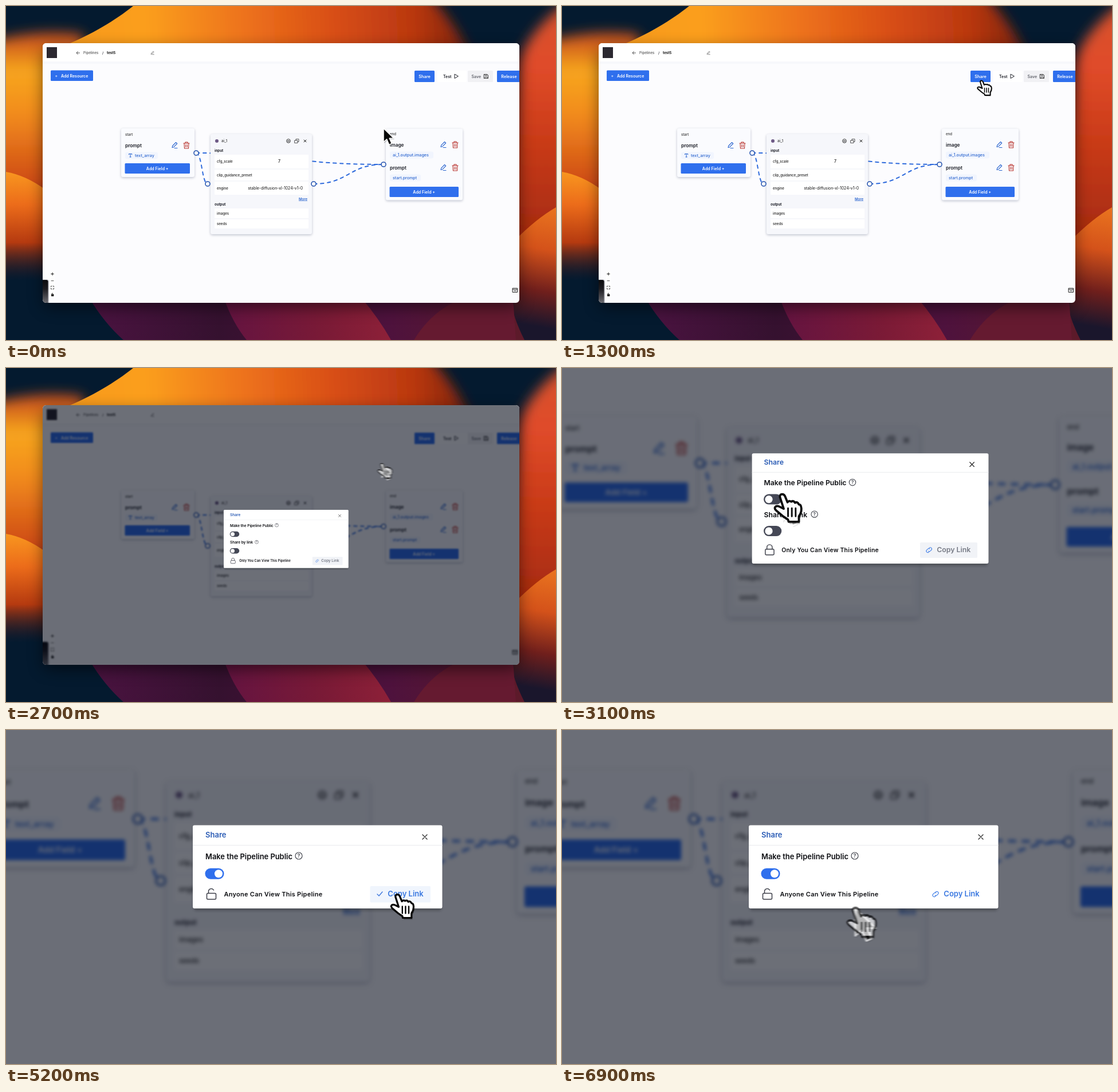
Recreate the animation shown at these times as an HTML page. Size 960x584 px, loop 7000 ms.

```html
<!DOCTYPE html>
<html lang="en">
<head>
<meta charset="utf-8">
<title>Share a pipeline</title>
<style>
html, body { margin: 0; width: 100%; height: 100%; overflow: hidden; background: #041a2f; }
svg { display: block; position: absolute; left: 0; top: 0; width: 960px; height: 584px; }
text { font-family: Inter, "Liberation Sans", sans-serif; white-space: pre; }
</style>
</head>
<body>
<svg id="stage" viewBox="0 0 960 584" xmlns="http://www.w3.org/2000/svg">
<defs>
  <filter id="haze" x="-20%" y="-50%" width="140%" height="200%"><feGaussianBlur stdDeviation="11"/></filter>
  <filter id="shade" x="-20%" y="-20%" width="140%" height="140%"><feGaussianBlur stdDeviation="14"/></filter>
  <filter id="soft" x="-10%" y="-10%" width="120%" height="120%"><feGaussianBlur stdDeviation="2.2"/></filter>
  <filter id="frost" filterUnits="userSpaceOnUse" x="50" y="50" width="860" height="490" color-interpolation-filters="sRGB"><feGaussianBlur stdDeviation="1.7"/></filter>
  <filter id="smear" filterUnits="userSpaceOnUse" x="-30" y="-20" width="80" height="80"><feGaussianBlur id="smearBlur" stdDeviation="0"/></filter>
  <clipPath id="winClip"><rect x="64" y="65" width="832" height="454" rx="6"/></clipPath>
  <clipPath id="petalClip"><path d="M222 0C192 24 150 50 100 70H960V0Z"/></clipPath>
  <linearGradient id="gTop" gradientUnits="userSpaceOnUse" x1="120" y1="60" x2="810" y2="30">
    <stop offset="0" stop-color="#f79a1b"/><stop offset=".18" stop-color="#fb9f1e"/><stop offset=".42" stop-color="#ee741b"/>
    <stop offset=".65" stop-color="#d94f17"/><stop offset=".86" stop-color="#b93710"/><stop offset="1" stop-color="#7a220e"/>
  </linearGradient>
  <linearGradient id="gLeft" gradientUnits="userSpaceOnUse" x1="0" y1="55" x2="0" y2="320">
    <stop offset="0" stop-color="#c9501a"/><stop offset=".22" stop-color="#f7a620"/><stop offset=".5" stop-color="#f28c1d"/><stop offset="1" stop-color="#cb4515"/>
  </linearGradient>
  <linearGradient id="gLeft2" gradientUnits="userSpaceOnUse" x1="0" y1="290" x2="0" y2="480">
    <stop offset="0" stop-color="#f8961f"/><stop offset=".3" stop-color="#ec6c1a"/><stop offset=".65" stop-color="#b53a10"/><stop offset="1" stop-color="#3a1a20" stop-opacity="0"/>
  </linearGradient>
  <linearGradient id="gRight" gradientUnits="userSpaceOnUse" x1="0" y1="10" x2="0" y2="400">
    <stop offset="0" stop-color="#d8522c"/><stop offset=".25" stop-color="#e04b2a"/><stop offset=".6" stop-color="#c83a17"/><stop offset="1" stop-color="#a62b10"/>
  </linearGradient>
  <linearGradient id="gRight2" gradientUnits="userSpaceOnUse" x1="960" y1="355" x2="925" y2="560">
    <stop offset="0" stop-color="#e9731f"/><stop offset=".35" stop-color="#d4521a"/><stop offset=".7" stop-color="#701f1c"/><stop offset="1" stop-color="#1a162c"/>
  </linearGradient>
  <linearGradient id="gBase" gradientUnits="userSpaceOnUse" x1="150" y1="0" x2="890" y2="0">
    <stop offset="0" stop-color="#4a1340"/><stop offset=".3" stop-color="#35112f"/><stop offset=".7" stop-color="#4e123d"/><stop offset="1" stop-color="#5c1a2a"/>
  </linearGradient>
  <linearGradient id="gMid" gradientUnits="userSpaceOnUse" x1="390" y1="0" x2="665" y2="0">
    <stop offset="0" stop-color="#651440"/><stop offset=".6" stop-color="#7a1a36"/><stop offset="1" stop-color="#8c2038"/>
  </linearGradient>
  <linearGradient id="gTab" x1="0" y1="0" x2="0" y2="1"><stop offset="0" stop-color="#0b0b0e"/><stop offset=".35" stop-color="#1c1c21"/><stop offset="1" stop-color="#77777d"/></linearGradient>
</defs>
<g id="wall">
  <rect width="960" height="584" fill="#041a2f"/>
  <path d="M-40 66Q50 38 135 50V330H-40Z" fill="url(#gLeft)" filter="url(#haze)"/>
  <path d="M0 290Q35 296 70 322V500H0Z" fill="url(#gLeft2)"/>
  <g clip-path="url(#petalClip)"><path d="M0-60H690Q775 0 815 100H0Z" fill="url(#gTop)" filter="url(#haze)"/></g>
  <path d="M1000-20Q918 30 893 100L870 440H1000Z" fill="url(#gRight)" filter="url(#haze)"/>
  <path d="M960 352Q925 372 886 412V584H960Z" fill="url(#gRight2)"/>
  <path d="M145 510Q172 555 205 584H905Q885 545 880 510Z" fill="url(#gBase)"/>
  <path d="M380 510Q396 555 420 584H672Q650 545 620 510Z" fill="url(#gMid)"/>
  <path d="M800 510Q745 530 712 584H890L885 510Z" fill="#651a30"/>
</g>
<g id="view">
  <rect x="66" y="76" width="828" height="450" rx="8" fill="#000" opacity=".55" filter="url(#shade)"/>
  <g clip-path="url(#winClip)">
    <rect x="64" y="65" width="832" height="454" fill="#fcfcfe"/>
    <g id="app"></g>
    <rect id="dim" x="64" y="65" width="832" height="454" fill="#030816" opacity=".58"/>
  </g>
  <g id="dialog" transform="translate(217 179.25) scale(.5)"></g>
  <g id="cursor">
    <g filter="url(#smear)">
      <g id="arrow">
        <path d="M1 2V26L6.500 21L10.500 30L15 28L11 19H19Z" fill="#000" opacity=".25"/>
        <path d="M0 0V24L5.600 18.900L9.600 28.500L14.200 26.500L10.200 17.300H17.800Z" fill="#080808" stroke="#fff" stroke-width="1.500" stroke-linejoin="round"/>
      </g>
      <g id="hand" transform="scale(.5)" stroke-linecap="round" stroke-linejoin="round">
        <path id="palmShade" fill="#000" opacity=".25" transform="translate(2 4)"/>
        <path id="palm" fill="#fff" stroke="#060606" stroke-width="4"/>
        <path d="M11 25V40M18 25V40M25 25V40" stroke="#060606" stroke-width="3" fill="none"/>
      </g>
    </g>
  </g>
</g>
</svg>
<script>
const LOOP = 7000, STEP = 100;
const BLUE = '#2f6fed', INK = '#1d1f27', LINK = '#2c66cf', RED = '#b8322c';
const $ = id => document.getElementById(id);

// drawing helpers
const text = (x, y, s, size, fill = INK, weight = 500, more = '') =>
  `<text x="${x}" y="${y}" font-size="${size}" fill="${fill}" font-weight="${weight}" ${more}>${s}</text>`;
const rect = (x, y, w, h, fill, r = 1.5, more = '') =>
  `<rect x="${x}" y="${y}" width="${w}" height="${h}" rx="${r}" fill="${fill}" ${more}/>`;
const line = (d, color, w = 1, more = '') =>
  `<path d="${d}" fill="none" stroke="${color}" stroke-width="${w}" stroke-linecap="round" stroke-linejoin="round" ${more}/>`;
const at = (x, y, s, k = 1) => `<g transform="translate(${x} ${y}) scale(${k})">${s}</g>`;
const mid = 'text-anchor="middle"';

const button = (x, y, w, h, label, size = 7) =>
  rect(x, y, w, h, BLUE) + text(x + w / 2, y + h / 2 + size * .36, label, size, '#fff', 600, mid);
const card = (x, y, w, h, fill) =>
  rect(x, y + 1.5, w, h, '#5a6480', 3, 'opacity=".38" filter="url(#soft)"') + rect(x, y, w, h, fill, 3);
const pencil = (x, y, color, k = 1) =>
  at(x, y, line('M-4 4L-3.300 1L2.500-5L4.700-3L-1.200 3.200ZM0 5H5', color, 1.1), k);
const trash = (x, y) =>
  at(x, y, line('M-5-3.500H5M-2-3.500V-5.500H2V-3.500M-4-3.500L-3.500 5.500H3.500L4-3.500M-1.300-1V3M1.300-1V3', RED, 1.1));
const knob = (x, y) => `<circle cx="${x}" cy="${y}" r="4" fill="#fff" stroke="#2856b0" stroke-width="1.600"/>`;
const edge = (x1, y1, x2, y2) => {
  const m = (x1 + x2) / 2;
  return line(`M${x1} ${y1}C${m} ${y1} ${m} ${y2} ${x2} ${y2}`, '#2f6bdc', 2, 'stroke-dasharray="5.5 6.5"');
};
const pill = (x, y, w) => rect(x, y, w, 12, '#f1f5fe', 3);
const field = (x, y, name) => text(x, y + 3.5, name, 8.3, INK, 600);
const tools = (x, y) => pencil(x, y, LINK) + trash(x + 21, y);

function header() {
  return rect(64, 65, 832, 32, '#fff', 0) + rect(64, 97, 832, 4, '#f7f8fb', 0)
    + rect(71, 72, 18, 19, '#2b2830', 0)
    + line('M128.500 82H123M125.500 79.500L123 82L125.500 84.500', '#444', .9)
    + text(135, 84.2, 'Pipelines', 6.1, '#555') + text(168, 84.2, '/', 6.1)
    + text(176, 84.2, 'test5', 6.1, '#111', 700) + pencil(255.5, 82, '#333', .55);
}

function toolbar() {
  return rect(78, 112.5, 74, 18.5, BLUE)
    + text(85.5, 124.6, '+', 7, '#fff', 500) + text(96, 124.6, 'Add Resource', 7, '#fff', 600)
    + button(713, 113, 35, 20, 'Share', 7.3)
    + rect(753, 113, 51, 20, '#fff') + text(763, 125.8, 'Test', 7, INK, 600)
    + line('M783 119.500V126.500L789 123Z', INK, 1)
    + rect(806, 113, 44, 20, '#f1f1f4') + text(812.5, 125.8, 'Save', 7, '#62646c', 600)
    + line('M834.500 119.500H840L841.500 121V126.500H834.500ZM836 119.500V121.500H839.500V119.500M836 126.500V124H840V126.500', '#333', .9)
    + button(857, 113, 42, 20, 'Release', 7.2);
}

function startCard() {
  return card(201, 214, 128, 85, '#fafbfe')
    + text(208, 227, 'start', 6, '#333') + field(208, 243.5, 'prompt') + tools(294, 243.5)
    + pill(208, 255.5, 57) + line('M214.500 259.800V258.500H219.700V259.800M217.100 258.500V264M216 264H218.200', LINK, 1)
    + text(225, 264, 'text_array', 7.1, LINK) + button(207.5, 275, 113.5, 18, 'Add Field +', 7.1);
}

function endCard() {
  return card(663, 214.5, 134, 125, '#fafbfe')
    + text(670, 226, 'end', 6, '#333')
    + field(670, 242, 'image') + tools(763, 242.5) + pill(670, 254.5, 76) + text(675, 263, 'ai_1.output.images', 7.2, LINK)
    + field(670, 282.5, 'prompt') + tools(763, 282.5) + pill(670, 294.5, 54) + text(675, 303, 'start.prompt', 7.1, LINK)
    + button(669.5, 316, 120.5, 18, 'Add Field +', 7.1);
}

function modelCard() {
  const rows = [[260, 24, 'cfg_scale'], [286, 19, 'clip_guidance_preset'], [307, 23, 'engine'], [354, 17, 'images'], [373, 16, 'seeds']];
  return card(357, 224, 177, 175, '#f6f7fb')
    + '<circle cx="368" cy="236" r="3" fill="#6e5a86"/>' + text(376, 238.3, 'ai_1', 6.3, '#333')
    + '<circle cx="493" cy="236" r="3.300" fill="none" stroke="#333"/>' + line('M491.500 235.500H494.500M491.500 237H494.500', '#333', .8)
    + line('M504 235H509V239.500H504ZM506 235V232.700H511V237.300H509', '#333', .8)
    + line('M520 234L524 238M524 234L520 238', '#222', 1)
    + text(364, 255, 'input', 6, INK, 700)
    + rows.map(([y, h, s]) => rect(364, y, 164, h, '#fff', 1) + text(368, y + h / 2 + 2, s, 6.1, '#222')).join('')
    + text(477, 274.3, '7', 7, '#111', 500, mid)
    + text(518, 320.5, 'stable-diffusion-xl-1024-v1-0', 6.9, '#111', 400, 'text-anchor="end"')
    + text(526, 339.5, 'More', 6, LINK, 600, 'text-anchor="end" text-decoration="underline"')
    + text(364, 349.3, 'output', 6, INK, 700);
}

function corners() {
  return rect(77, 463, 8, 47, '#fff')
    + line('M78.700 468.500H83.300M81 466.200V470.800', '#222', 1) + line('M79 480.500H83', '#555', 1)
    + line('M78.500 491V489.800H80M82 489.800H83.500V491M78.500 493.500V495H80M82 495H83.500V493.500', '#333', .9)
    + rect(79, 504, 4.4, 3.6, '#111', .6) + line('M80 504V502.800Q81.200 501.300 82.300 503', '#111', .9)
    + rect(60, 478, 15, 46, '#c9cad0', 4) + rect(60, 479, 13.5, 44, 'url(#gTab)', 3)
    + line('M884.500 493.500H892.500V500.500H884.500ZM884.500 495.700H892.500M887 498H890', '#222', 1);
}

$('app').innerHTML = header() + toolbar()
  + edge(332, 257, 659, 277) + edge(332, 257, 352, 311) + edge(537, 311, 659, 277)
  + startCard() + modelCard() + endCard()
  + knob(332, 257) + knob(352, 311) + knob(537, 311) + knob(659, 277) + corners();

const palm = 'M-4 4Q-4-1 0-1Q4-1 5.500 3L10 14Q13 10 17 13Q21 10 24 15Q28 12 31 18Q35 18 35.500 25Q36 33 31 40V50H12L11 46L2 40L-11 29Q-15 25-12 22Q-9 20-5 22L3 26Z';
$('palm').setAttribute('d', palm);
$('palmShade').setAttribute('d', palm);

// dialog parts, drawn at double size
const help = (x, y) => `<circle cx="${x}" cy="${y}" r="6" fill="none" stroke="#44464f" stroke-width="1.200"/>`
  + text(x, y + 3.2, '?', 9, '#44464f', 600, mid);
const toggle = (y, on) => rect(347.5, y - 9.5, 33, 19, on ? BLUE : '#454856', 9.5)
  + `<circle cx="${on ? 371 : 357}" cy="${y}" r="7" fill="#fff"/>`;
const padlock = (y, open) => rect(350.5, y - 1.5, 16, 10.5, 'none', 2, 'stroke="#3c3e48" stroke-width="1.500"')
  + line(`M353.500 ${y - 1.5}V${y - 5}A4.800 4.800 0 0 1 ${open ? 362.5 : 363.2} ${open ? y - 7 : y - 5}${open ? '' : `V${y - 1.5}`}`, '#3c3e48', 1.5);
const chain = y => at(652, y, line('M-1 2A2.600 2.600 0 0 0 2.200 2L4.400-.2A2.700 2.700 0 0 0 .6-4L-.4-3M1-2A2.600 2.600 0 0 0-2.200-2L-4.400.2A2.700 2.700 0 0 0-.6 4L.4 3', '#4a85e8', 1.2));
const tick = y => line(`M648 ${y}L651 ${y + 3}L657 ${y - 4}`, '#3f78dd', 1.4);

function drawDialog(s) {
  const pub = s.pub, top = pub ? 166.5 : 137.7, end = pub ? 312 : 341, foot = end - 25;
  let out = rect(328, top + 4, 432, end - top, '#000', 4, 'opacity=".25" filter="url(#soft)"')
    + rect(326, top, 435.5, end - top, '#fff', 3)
    + text(348, top + 21.4, 'Share', 13, '#2b5cb5', 600)
    + `<path d="M326 ${top + 35}H761.500" stroke="#e9eaee"/>`
    + at(731, top + 20.5, line('M-4-4L4 4M4-4L-4 4', '#333', 1.4))
    + text(348, top + 59.4, 'Make the Pipeline Public', 12.9, '#0d0e12', 600) + help(511, top + 53.5)
    + toggle(top + 84.8, pub);
  if (s.spin) out += `<circle cx="400" cy="222" r="8" fill="none" stroke="#c3c4c9" stroke-width="2.500"/>`
    + line('M400 214A8 8 0 0 1 408 222', '#3c3e48', 2.5, `transform="rotate(${s.angle} 400 222)"`);
  if (!pub) out += text(348, 256, 'Share by link', 12.9, '#0d0e12', 600) + help(441, 250) + toggle(281, false);
  out += padlock(foot, pub)
    + text(380.5, foot + 4, (pub ? 'Anyone' : 'Only You') + ' Can View This Pipeline', 11, '#0d0e12', 600, 'letter-spacing=".25"');
  if (!pub || s.hover) out += rect(635.5, foot - 14, 105.5, 28.5, pub ? '#f0f5fd' : '#f1f3f7', 2);
  out += s.copied ? tick(foot) : chain(foot);
  return out + text(666.3, foot + 4.4, 'Copy Link', 13, pub ? '#3a78e0' : '#777b86', 600);
}

// keyed values with a smooth run between neighbours
function track(t, keys) {
  let i = keys.findIndex(k => k[0] > t);
  if (i === 0) return keys[0][1];
  if (i < 0) return keys[keys.length - 1][1];
  const [t0, a] = keys[i - 1], [t1, b] = keys[i], p = (t - t0) / (t1 - t0);
  return a + (b - a) * p * p * (3 - 2 * p);
}
const within = (t, a, b) => t >= a && t < b;

const stops = [[0, 659, 214], [560, 659, 214], [1300, 732, 131], [2500, 732, 131], [3140, 404, 288],
  [4400, 404, 288], [4950, 558.5, 323.5], [6600, 558.5, 323.5], [7090, 430, 341]];
const xs = stops.map(([t, x]) => [t, x]), ys = stops.map(([t, , y]) => [t, y]);
const handKeys = [[1150, 0], [1300, 1], [2600, 1], [2800, 0], [3000, 0], [3150, 1], [4400, 1], [4550, 0], [4800, 0], [4900, 1], [6800, 1], [7000, 0]];
const showKeys = [[1450, 1], [1650, 0], [2150, 0], [2250, 1]];
const pressKeys = [[2250, 1], [2350, .8], [2500, 1], [3500, 1], [3600, .8], [3750, 1], [5000, 1], [5100, .8], [5250, .8], [5400, 1]];

function draw(t) {
  const k = track(t, [[2700, 0], [3200, 1]]);
  $('view').setAttribute('transform', `translate(${-434 * k} ${-358.5 * k}) scale(${1 + k})`);

  const open = t >= 2500;
  $('dim').style.display = $('dialog').style.display = open ? '' : 'none';
  if (open) $('app').setAttribute('filter', 'url(#frost)');
  else $('app').removeAttribute('filter');
  if (open) $('dialog').innerHTML = drawDialog({
    pub: t >= 4300, spin: within(t, 3700, 4300), angle: (t - 3900) * .36,
    hover: within(t, 4800, 6770), copied: within(t, 5100, 6400)
  });

  const x = track(t, xs), y = track(t, ys), hand = track(t, handKeys);
  const vx = Math.abs(track(t + 10, xs) - track(t - 10, xs)), vy = Math.abs(track(t + 10, ys) - track(t - 10, ys));
  $('smearBlur').setAttribute('stdDeviation', `${Math.min(1.4, vx * .11)} ${Math.min(1.4, vy * .11)}`);
  $('cursor').setAttribute('transform', `translate(${x} ${y}) scale(${track(t, pressKeys)})`);
  $('cursor').setAttribute('opacity', track(t, showKeys));
  $('hand').setAttribute('opacity', Math.min(1, hand * 1.3));
  $('arrow').setAttribute('opacity', Math.min(1, (1 - hand) * 1.3));
}

const begin = performance.now();
function frame() {
  const t = (performance.now() - begin) % LOOP;
  draw(Math.floor(t / STEP) * STEP);
  requestAnimationFrame(frame);
}
frame();
</script>
</body>
</html>
```
